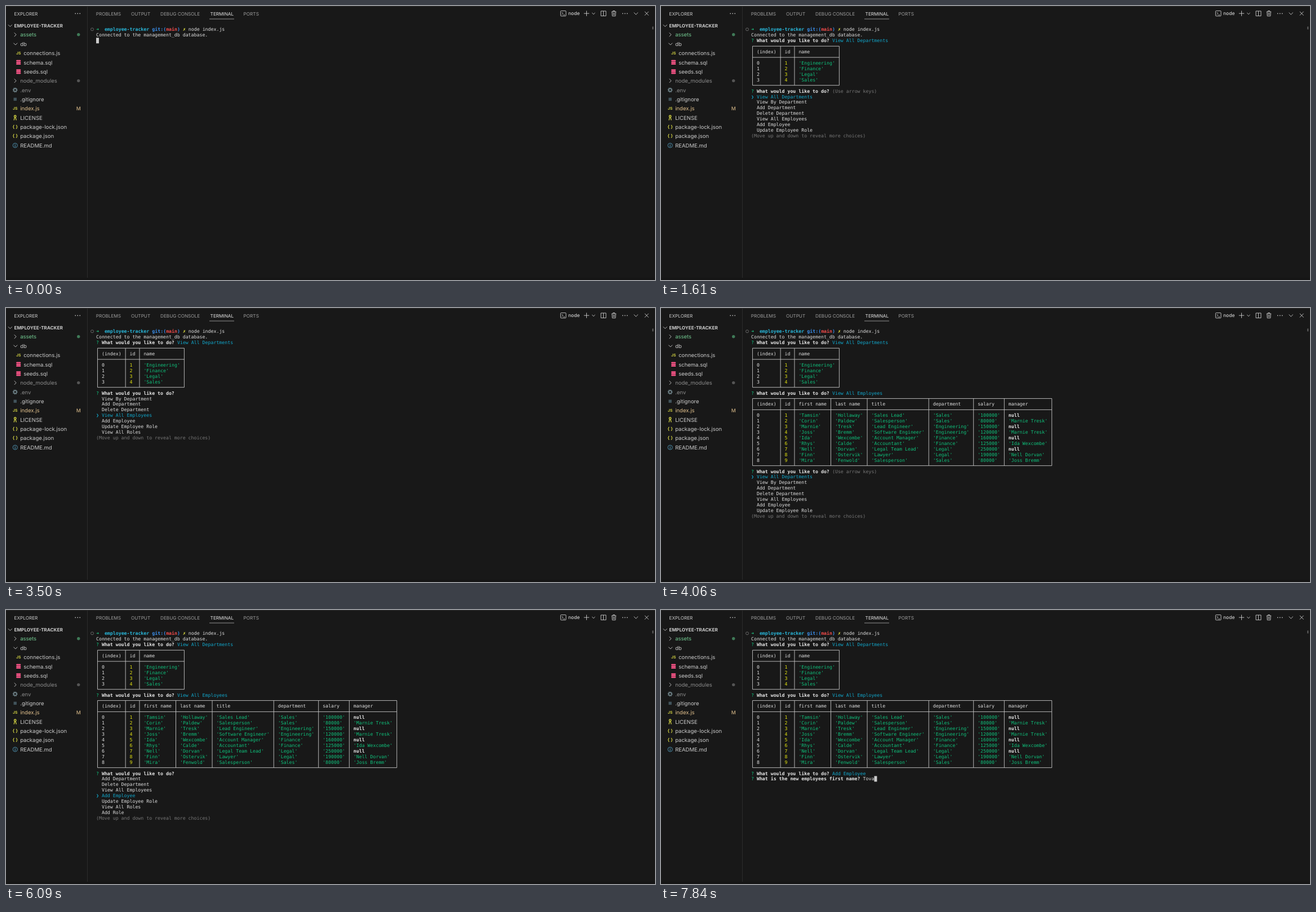
An HTML page that plays this animation: 1152 by 486 pixels, repeating every 8 s.

```html
<!DOCTYPE html>
<html lang="en">
<head>
<meta charset="utf-8">
<title>Employee tracker terminal</title>
<style>
  html, body { margin: 0; width: 100%; height: 100%; overflow: hidden; background: #181818; }
  svg { display: block; width: 100vw; height: 100vh; }
  text { text-rendering: geometricPrecision; fill: #ccc; }
  #side text, #bar text { font-family: Inter, sans-serif; }
  #side text { font-size: 9.5px; }
  #side .head, #bar text { font-size: 8.2px; }
  #side .icon { font-size: 6.8px; font-weight: 700; fill: #cbcb41; }
  #bar .tab { fill: #9d9d9d; }
  #bar .on { fill: #e7e7e7; }
  .line { fill: none; stroke: #ccc; stroke-width: .9; }
  .edge { fill: none; stroke: #2b2b2b; }
  #term text { font: 8.245px "DejaVu Sans Mono", "DejaVu Sans", monospace; fill: #e0e0e0; }
  #term .bold { font-weight: 700; fill: #e8e8e8; }
  #term .dim { fill: #777; }
  #term .cyan { fill: #11a8cd; }
  #term .green { fill: #0fc27c; }
  #term .yellow { fill: #e5e510; }
  #term .dir, #term .git, #term .branch, #term .ok, #term .dirty { font-weight: 700; }
  #term .dir { fill: #29b8db; }
  #term .git { fill: #3b8eea; }
  #term .branch { fill: #f14c4c; }
  #term .ok { fill: #23d18b; }
  #term .dirty { fill: #f5f543; }
  #term path { fill: none; stroke: #c8c8c8; stroke-width: .9; }
</style>
</head>
<body>
<svg viewBox="0 0 1152 486">
  <rect width="1152" height="486" fill="#181818"/>
  <rect y="482" width="1152" height="4" fill="#151515"/>
  <path class="edge" d="M0 .5H1152M144.5 0V482"/>
  <g id="side">
    <text class="head" x="14.5" y="16.7">EXPLORER</text>
    <text class="head" x="14.5" y="37.7" font-weight="700">EMPLOYEE-TRACKER</text>
    <path class="line" d="M4 33.3l3.3 3.3 3.3-3.3"/>
  </g>
  <g id="bar">
    <path d="M361 23H405" stroke="#909090" stroke-width="1"/>
    <rect class="line" x="984.4" y="8.6" width="9.6" height="9.2" rx="1"/>
    <path class="line" d="M986.5 11l2.2 2.2-2.2 2.2M989.3 15.8h2.8"/>
    <text x="998" y="16.4" font-weight="500" style="font-size:8.5px">node</text>
    <path class="line" d="M1030.5 8.5v9.4M1025.8 13.2h9.4M1040.2 12l2.7 2.7 2.7-2.7"/>
    <path class="line" d="M1056 9h9v8.6h-9zM1060.5 9v8.6"/>
    <path class="line" d="M1074.8 10.2h8.4M1077.5 10v-1.5h3V10M1075.7 10.2l.5 7.6h5.6l.5-7.6M1078 12v4.2M1080 12v4.2"/>
    <path class="line" d="M1114.6 11.6l3.6 3.6 3.6-3.6M1133.8 9.9l6.8 6.8M1140.6 9.9l-6.8 6.8"/>
  </g>
  <circle cx="153" cy="41.4" r="2.5" fill="none" stroke="#707070" stroke-width=".9"/>
  <rect x="1147" y="36.5" width="2.4" height="5" fill="#555"/>
  <g id="term"></g>
</svg>
<script>
const LOOP = 8000;
const CELL = 4.965, ROW = 9.925, LEFT = 160, TOP = 36.5;
const byId = id => document.getElementById(id);
const add = (id, markup) => byId(id).insertAdjacentHTML('beforeend', markup);

// Sidebar and toolbar
const icons = {
  closed: (x, y) => `<path class="line" d="M${x - 1.5} ${y - 3.4}l3.4 3.4-3.4 3.4"/>`,
  open: (x, y) => `<path class="line" d="M${x - 2.8} ${y - 1.5}l3.4 3.4 3.4-3.4"/>`,
  js: (x, y) => `<text class="icon" x="${x}" y="${y + 2.4}" text-anchor="middle">JS</text>`,
  json: (x, y) => `<text class="icon" x="${x}" y="${y + 2.2}" text-anchor="middle" style="font-size:8px">{ }</text>`,
  sql: (x, y) => [-2.9, 0, 2.9].map(dy =>
    `<rect x="${x - 4.1}" y="${y + dy - 1.2}" width="8.2" height="2.5" rx="1.2" fill="#f55385"/>`).join(''),
  gear: (x, y) => `<circle cx="${x}" cy="${y}" r="2.6" fill="none" stroke="#6d8086" stroke-width="1.6"/>
    <circle cx="${x}" cy="${y}" r="3.8" fill="none" stroke="#6d8086" stroke-width="1.2" stroke-dasharray="1.5 1.485"/>`,
  square: (x, y) => `<rect x="${x - 2.7}" y="${y - 2.7}" width="5.4" height="5.4" fill="#41535b"/>`,
  key: (x, y) => `<circle cx="${x}" cy="${y - 2.4}" r="1.7" fill="none" stroke="#cbcb41" stroke-width="1.5"/>
    <path d="M${x - .7} ${y - .5}l-1.4 5M${x + .7} ${y - .5}l1.4 5" stroke="#cbcb41" stroke-width="1.4"/>`,
  info: (x, y) => `<circle cx="${x}" cy="${y}" r="4" fill="none" stroke="#519aba" stroke-width=".9"/>
    <path d="M${x} ${y - 2.3}v1.2M${x} ${y - .4}v2.8" stroke="#519aba" stroke-width="1.1"/>`
};
const files = [
  ['closed', 'assets', '#73c991'], ['open', 'db'],
  ['js', 'connections.js', '', 6], ['sql', 'schema.sql', '', 6], ['sql', 'seeds.sql', '', 6],
  ['closed', 'node_modules', '#8c8c8c'], ['gear', '.env', '#8c8c8c'], ['square', '.gitignore'],
  ['js', 'index.js', '#e2c08d'], ['key', 'LICENSE'], ['json', 'package-lock.json'],
  ['json', 'package.json'], ['info', 'README.md']
];
files.forEach(([icon, name, color, indent = 0], i) => {
  const y = 51 + 16.37 * i;
  add('side', icons[icon](16.2 + indent, y - .2) +
    `<text x="${25.2 + indent}" y="${y + 3.4}" style="fill:${color || '#ccc'}">${name}</text>`);
});
const disc = (x, y, r, color) => `<circle cx="${x}" cy="${y}" r="${r}" fill="${color}"/>`;
const dots = x => [-4, 0, 4].map(dx => disc(x + dx, 13.4, .8, '#ccc')).join('');
add('side', disc(128.7, 50.8, 2.7, '#3f7a57') + disc(128.7, 132.6, 2.7, '#555') + dots(127.2) +
  '<text x="124.8" y="185" style="fill:#c5a97e;font-size:8.8px" font-weight="500">M</text>');
const tabs = { PROBLEMS: 159.7, OUTPUT: 222, 'DEBUG CONSOLE': 274, TERMINAL: 362.6, PORTS: 421.6 };
for (const [name, x] of Object.entries(tabs))
  add('bar', `<text class="tab ${name === 'TERMINAL' ? 'on' : ''}" x="${x}" y="16.7">${name}</text>`);
add('bar', dots(1098.7));

// Terminal
const colX = col => LEFT + CELL * col;
const rowY = row => TOP + ROW * row;
const put = (row, col, text, style = '') =>
  `<text class="${style}" x="${colX(col)}" y="${rowY(row) + 7.9}">${text}</text>`;
const cursor = (row, col) =>
  `<rect x="${colX(col)}" y="${rowY(row)}" width="${CELL}" height="${ROW}" fill="#ccc"/>`;
const ask = (row, question, answer = '', style = 'cyan') =>
  put(row, 0, '?', 'green') + put(row, 2, question, 'bold') + put(row, question.length + 3, answer, style);

const QUESTION = 'What would you like to do?';
const choices = ['View All Departments', 'View By Department', 'Add Department', 'Delete Department',
  'View All Employees', 'Add Employee', 'Update Employee Role', 'View All Roles', 'Add Role'];

function menu(row, picked) {
  const first = Math.max(0, picked - 3);
  const items = choices.slice(first, first + 7).map((label, i) => {
    const on = first + i === picked;
    return (on ? put(row + 1 + i, 0, '❯', 'cyan') : '') + put(row + 1 + i, 2, label, on ? 'cyan' : '');
  });
  return ask(row, QUESTION, picked ? '' : '(Use arrow keys)', 'dim') + items.join('') +
    put(row + 8, 0, '(Move up and down to reveal more choices)', 'dim');
}

// edges: character columns of the vertical rules
function table(row, edges, heads, records) {
  const mid = n => rowY(n + .5);
  const ruleX = edges.map(col => colX(col + .5));
  const last = row + records.length + 3;
  const across = [row, row + 2, last].map(n => `M${ruleX[0]} ${mid(n)}H${ruleX.at(-1)}`);
  const down = ruleX.map(x => `M${x} ${mid(row)}V${mid(last)}`);
  const cell = (n, i, text, style) => put(n, edges[i] + 2, text, style);
  const body = records.map((record, n) => {
    const y = row + 3 + n;
    return cell(y, 0, n) + cell(y, 1, n + 1, 'yellow') + record.split(',').map((value, i) =>
      value === 'null' ? cell(y, i + 2, value, 'bold') : cell(y, i + 2, `'${value}'`, 'green')).join('');
  });
  return `<path d="${across.join('')}${down.join('')}"/>` +
    ['(index)', 'id', ...heads].map((head, i) => cell(row + 1, i, head)).join('') + body.join('');
}

const prompt = put(0, 0, '➜', 'ok') + put(0, 3, 'employee-tracker', 'dir') + put(0, 20, 'git:(', 'git') +
  put(0, 25, 'main', 'branch') + put(0, 29, ')', 'git') + put(0, 31, '✗', 'dirty') +
  put(0, 33, 'node index.js') + put(1, 0, 'Connected to the management_db database.');
const departments = ask(2, QUESTION, choices[0]) +
  table(3, [0, 10, 15, 31], ['name'], ['Engineering', 'Finance', 'Legal', 'Sales']);
const employees = ask(11, QUESTION, choices[4]) +
  table(12, [0, 10, 15, 28, 41, 63, 79, 90, 107],
    ['first name', 'last name', 'title', 'department', 'salary', 'manager'], [
      'Tamsin,Hollaway,Sales Lead,Sales,100000,null',
      'Corin,Paldew,Salesperson,Sales,80000,Marnie Tresk',
      'Marnie,Tresk,Lead Engineer,Engineering,150000,null',
      'Joss,Bremm,Software Engineer,Engineering,120000,Marnie Tresk',
      'Ida,Wexcombe,Account Manager,Finance,160000,null',
      'Rhys,Calde,Accountant,Finance,125000,Ida Wexcombe',
      'Nell,Dorvan,Legal Team Lead,Legal,250000,null',
      'Finn,Ostervik,Lawyer,Legal,190000,Nell Dorvan',
      'Mira,Fenwold,Salesperson,Sales,80000,Joss Bremm'
    ]);

function nameEntry(typed) {
  const question = 'What is the new employees first name?';
  return ask(25, QUESTION, choices[5]) + ask(26, question, 'Tova'.slice(0, typed), '') +
    cursor(26, question.length + 3 + typed);
}

const passed = (times, t) => times.filter(time => t >= time).length;

function screen(t) {
  if (t < 70) return prompt + cursor(2, 0);
  if (t < 1610) return prompt + menu(2, 0);
  if (t < 4060) return prompt + departments + menu(11, passed([2380, 2730, 3150, 3500], t));
  const tail = t < 6440
    ? menu(25, passed([4620, 4970, 5250, 5670, 6090], t))
    : nameEntry(passed([7350, 7560, 7700, 7840], t));
  return prompt + departments + employees + tail;
}

let shown = '';
function draw() {
  const markup = screen(performance.now() % LOOP);
  if (markup !== shown) byId('term').innerHTML = shown = markup;
  requestAnimationFrame(draw);
}
draw();
</script>
</body>
</html>
```
